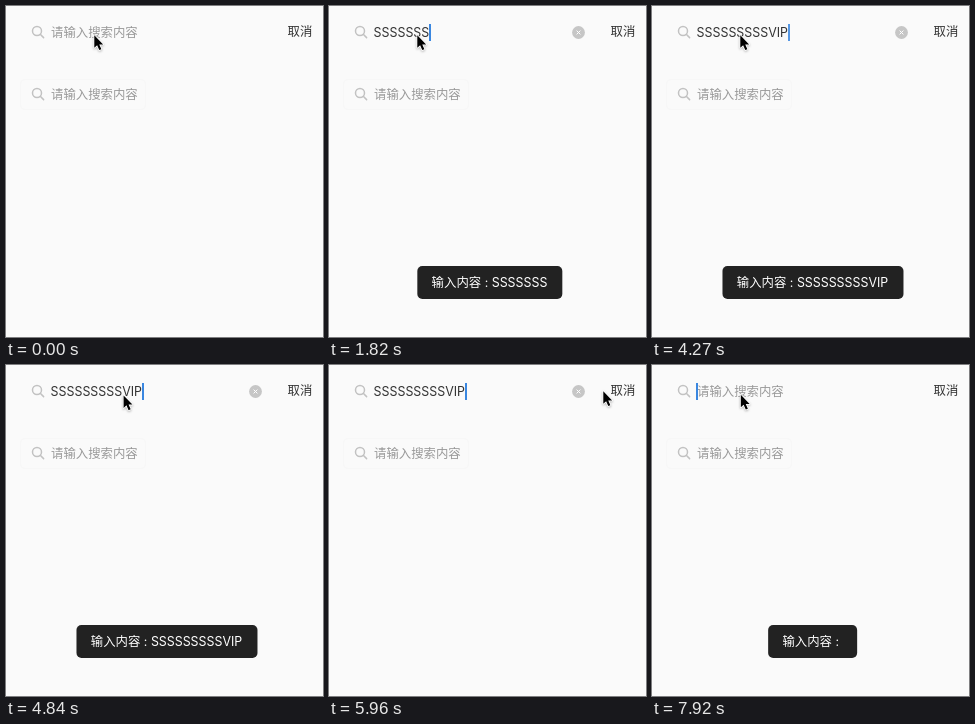
Animation of 317x331 px, one loop 8000 ms. Source, as an HTML page:

```html
<!DOCTYPE html>
<html lang="zh-CN">
<head>
<meta charset="utf-8">
<title>搜索框</title>
<style>
  html, body { margin: 0; width: 100%; height: 100%; overflow: hidden; background: #fafafa; }
  body {
    position: relative;
    font: 12.4px/20px Inter, "Noto Sans CJK SC", "Noto Sans CJK", sans-serif;
    color: #333;
  }
  body > * { position: absolute; white-space: pre; }
  .box { left: 14px; top: 73px; width: 124px; height: 29px; border: 1px solid #f7f7f7; border-radius: 5px; }
  .lens {
    left: 25.3px; width: 14px; height: 14px;
    fill: none; stroke: #c2c2c2; stroke-width: 1.5; stroke-linecap: round;
  }
  .hint { left: 45px; color: #999; }
  .first { top: 17px; }
  .second { top: 79px; }
  .lens.first { top: 19.2px; }
  .lens.second { top: 81.2px; }
  #value { left: 44.6px; top: 17px; }
  #caret {
    display: inline-block; width: 2px; height: 17px; margin-left: -.3px;
    vertical-align: -4px; background: #3a87e0;
  }
  #clear { left: 243px; top: 19.5px; width: 13px; height: 13px; }
  #cancel { left: 281.5px; top: 16px; }
  #toast {
    left: 160.5px; top: 259.6px; padding: 0 14.8px; transform: translateX(-50%);
    line-height: 33px; border-radius: 5px; background: #222; color: #fff;
  }
  #pointer {
    left: 0; top: 0; width: 13px; height: 20px; overflow: visible;
    filter: drop-shadow(0 1px 1px #0004);
  }
</style>
</head>
<body>
<div class="box"></div>
<svg class="lens first" viewBox="0 0 14 14"><g id="lens"><circle cx="6" cy="6" r="4.5"/><path d="M9.5 9.5L12.6 12.6"/></g></svg>
<svg class="lens second" viewBox="0 0 14 14"><use href="#lens"/></svg>
<div class="hint first" id="hint">请输入搜索内容</div>
<div class="hint second">请输入搜索内容</div>
<div id="value"><span id="typed"></span><span id="caret"></span></div>
<svg id="clear" viewBox="0 0 13 13"><circle cx="6.5" cy="6.5" r="6.4" fill="#c6c6c6"/><path d="M4.6 4.6l3.8 3.8m0-3.8l-3.8 3.8" stroke="#fff"/></svg>
<div id="cancel">取消</div>
<div id="toast"></div>
<svg id="pointer" viewBox="0 0 16 24"><path d="M0 0V15.4L3.5 12.2L6.1 18.2L8.7 17.1L6.1 11.3H10.9Z" stroke="#fff" stroke-width="2" stroke-linejoin="round" paint-order="stroke"/></svg>
<script>
  const LOOP = 8000, CLEARED = 6610;
  const TEXT = 'SSSSSSSSSVIP';
  const $ = id => document.getElementById(id);
  const ramp = (t, from, to) => Math.min(1, Math.max(0, (t - from) / (to - from)));
  const smooth = k => k * k * (3 - 2 * k);
  const mix = (a, b, k) => a + (b - a) * k;

  // The run of S slows slightly at first; the last three letters come at a calmer pace
  const keyTime = n => n < 9
    ? 300 + 242.5 * n + 90 * Math.sin(Math.PI * n / 8)
    : 2240 + 437 * (n - 8);

  function lastEdit(t) {
    if (t >= CLEARED) return { time: CLEARED, length: 0 };
    let length = 0;
    while (length < TEXT.length && keyTime(length) <= t) length++;
    // Before the first key a blink is already running
    return { time: length ? keyTime(length - 1) : -1030, length };
  }

  // Solid after an edit, then fades out and back in
  function caretAlpha(age) {
    const phase = (age - 690) % 980;
    return phase < 300 ? 1 - ramp(phase, 0, 200) : ramp(phase, 395, 570);
  }

  // Swings out to the cancel label, steps back to the clear button, returns to rest
  function pointerAt(t) {
    const out = ramp(t, 4790, 5900);
    const back = smooth(ramp(t, 5970, 6250));
    const home = smooth(ramp(t, 6640, 6970));
    const x = mix(mix(mix(88.3, 274.3, out ** .6), 246.5, back), 88.8, home);
    const y = mix(29, 26, out) + 4.5 * Math.sin(2 * Math.PI * out);
    return [x, mix(y, 29.5, home)];
  }

  function render(t) {
    const { time, length } = lastEdit(t);
    const age = t - time;
    const text = TEXT.slice(0, length);
    $('typed').textContent = text;
    $('hint').style.visibility = length ? 'hidden' : 'visible';
    $('clear').style.visibility = length ? 'visible' : 'hidden';
    $('caret').style.opacity = caretAlpha(age);
    $('toast').textContent = '输入内容 : ' + text;
    $('toast').style.opacity = time < 0 ? 0 : 1 - ramp(age, 2010, 2110);
    const [x, y] = pointerAt(t);
    $('pointer').style.transform = `translate(${x}px, ${y}px)`;
  }

  const start = performance.now();
  function tick() {
    render((performance.now() - start) % LOOP);
    requestAnimationFrame(tick);
  }
  tick();
</script>
</body>
</html>
```
